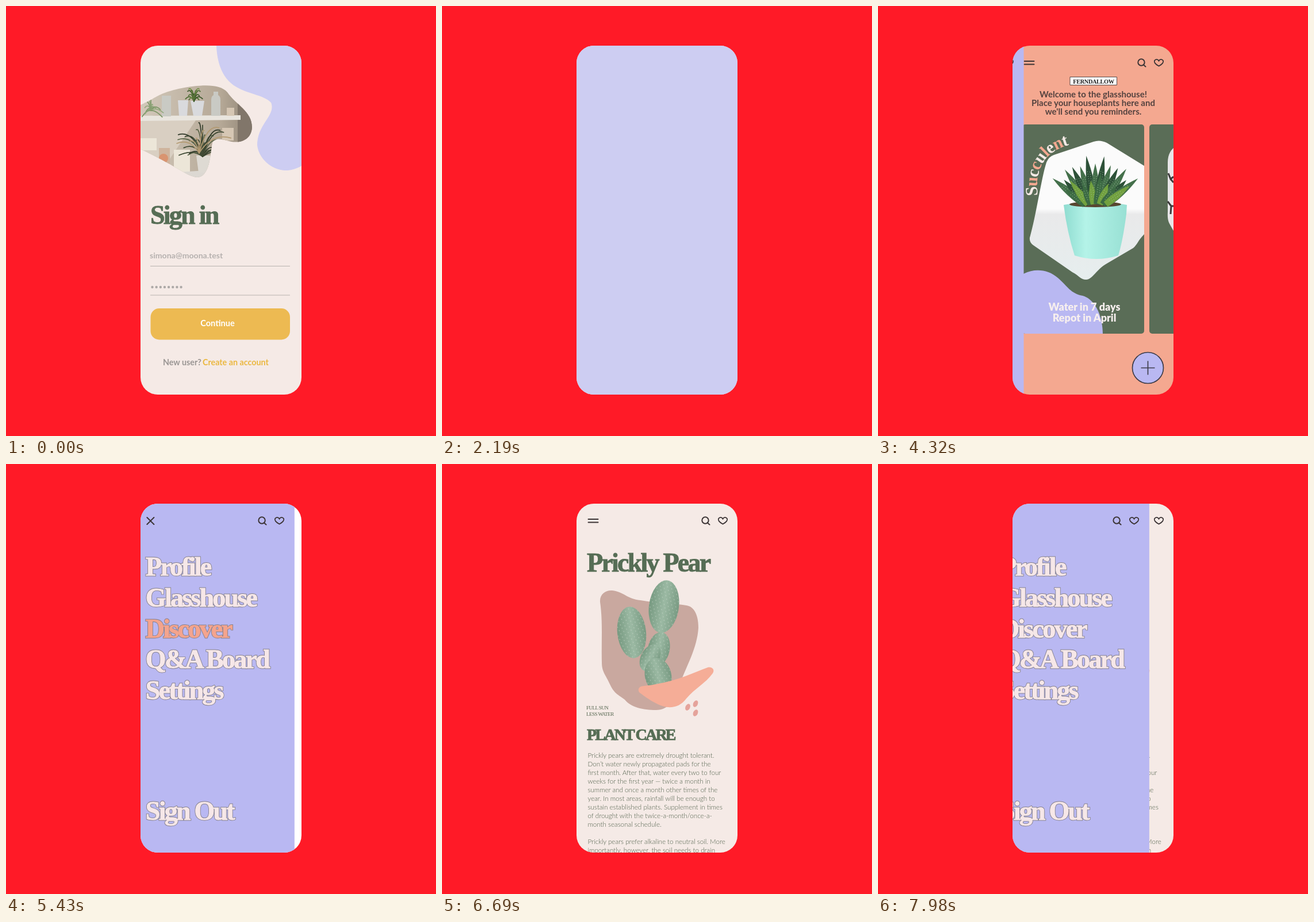
An HTML page that plays this animation: 748 px wide and 748 px high, repeating every 8000 ms.

```html
<!DOCTYPE html>
<html lang="en">
<head>
<meta charset="utf-8">
<title>Plant app</title>
<style>
html, body { margin: 0; height: 100%; overflow: hidden; background: #ff1a27; }
svg { display: block; width: 100vw; height: 100vh; }
text { font-family: Lato, sans-serif; font-weight: 700; }
.serif { font-family: "Liberation Serif", serif; letter-spacing: -.04em; }
.title { fill: #566d55; stroke: #566d55; stroke-width: .9; }
.big { font-size: 46px; letter-spacing: -.06em; }
.small { font-size: 9px; font-weight: 400; letter-spacing: -.06em; }
.mid { text-anchor: middle; }
.line { fill: none; stroke: #3b3435; stroke-width: 2; stroke-linecap: round; }
.heavy text { font-size: 18px; font-weight: 900; }
#body text { font-size: 11.6px; font-weight: 300; fill: #4c5d47; }
#items { color: #f6e7e8; }
#items text { fill: currentColor; stroke: currentColor; stroke-width: 1; }
#items .edge { stroke: #85818f; stroke-width: 2.8; }
</style>
</head>
<body>
<svg viewBox="0 0 748 748">
  <defs>
    <clipPath id="phone"><rect x="234" y="69" width="280" height="607" rx="30"/></clipPath>
    <clipPath id="shelfShape"><path d="M234 172C262 160 262 153 300 144C340 136 372 135 385 150C400 172 428 183 428 211C427 230 412 239 392 236C376 232 364 228 359 238C355 258 355 298 332 298C312 295 300 280 234 249Z"/></clipPath>
    <clipPath id="card"><rect x="251" y="206" width="212" height="364" rx="5"/></clipPath>
    <linearGradient id="wall"><stop stop-color="#d2c8ba"/><stop offset=".7" stop-color="#b5a896"/><stop offset="1" stop-color="#8b8072"/></linearGradient>
    <linearGradient id="backdrop" x2="0" y2="1"><stop offset=".49" stop-color="#fbfbfb"/><stop offset=".53" stop-color="#e9e9ea"/><stop offset="1" stop-color="#e6eeee"/></linearGradient>
    <linearGradient id="mint"><stop stop-color="#8fdcd0"/><stop offset=".35" stop-color="#b4f3e8"/><stop offset="1" stop-color="#98e0d4"/></linearGradient>
    <linearGradient id="pad"><stop stop-color="#769980"/><stop offset=".5" stop-color="#9bb9a3"/><stop offset="1" stop-color="#789a82"/></linearGradient>
    <pattern id="spines" width="8" height="10" patternUnits="userSpaceOnUse" patternTransform="rotate(18)">
      <path d="M2 2l1 2M6 7l1 2" stroke="#d3e0d2" stroke-opacity=".6"/>
    </pattern>
    <path id="arc" d="M278 330Q268 250 350 238"/>
    <g id="tools" class="line">
      <circle cx="458" cy="98" r="5.7"/><path d="M462 102.5L465.5 105.5"/>
      <path stroke-width="1.8" d="M488.5 104.5C482 101 480 97.5 481 95C483 92 486.5 92 488.5 95.5C490.5 92 494 92 496 95C497 97.5 495 101 488.5 104.5Z"/>
    </g>
    <g id="bar"><use href="#tools"/><path class="line" d="M254.5 96H271.5M254.5 101.5H271.5"/></g>
  </defs>

  <rect width="748" height="748" fill="#ff1a27"/>
  <g clip-path="url(#phone)">
    <g id="signIn">
      <path d="M234 69h280v607H234z" fill="#f5eae6"/>
      <g clip-path="url(#shelfShape)">
        <path d="M234 130h200v170H234z" fill="url(#wall)"/>
        <path d="M403 130h30v110h-30z" fill="#81766a"/>
        <path d="M234 199H330L262 300H234z" fill="#d9cfc2"/>
        <path d="M234 191L408 190V198L234 200z" fill="#e9e5de"/>
        <path d="M271 156h16v36h-16zM357 163q0-6 4-8v-6h8v6q4 2 4 8v28h-16z" fill="#c9cac4"/>
        <path d="M299 164h18l-2 27h-14zM321 165h24l-4 26h-15z" fill="#d9dadd"/>
        <path d="M384 177h13v14h-13zM376 212h20v22h-20z" fill="#d6c7b4"/>
        <path d="M234 230h28v21h-28zM292 250h28v42h-28z" fill="#ece6d8"/>
        <path d="M266 247h19v28h-19z" fill="#cfb49d"/><circle cx="274" cy="265" r="8" fill="#d99470"/>
        <path d="M288 290L360 285V300H288z" fill="#dcd8d2"/>
        <path d="M331 260h26l-4 30h-18z" fill="#dedad3"/>
        <g id="grass" fill="none" stroke-linecap="round"></g>
      </g>
      <text class="serif title big" x="251" y="379">Sign in</text>
      <text x="250" y="439" font-size="14.1" fill="#b5b0ae">simona@moona.test</text>
      <path d="M254.5 489H306" stroke="#aeaaa8" stroke-width="4.4" stroke-linecap="round" stroke-dasharray="0 7.15"/>
      <path d="M251 452.5H494M251 503H494" stroke="#b9b3af"/>
      <rect id="press" x="251.5" y="526" width="242.5" height="54.5" rx="15"/>
      <text class="mid" x="368" y="557" font-size="14.6" fill="#fff">Continue</text>
      <text x="273" y="625" font-size="14.3" fill="#999593">New user?</text>
      <text x="342" y="625" font-size="14.3" fill="#ebb840">Create an account</text>
      <path id="wave" fill="#cdcdf2" d="M366 69C367 95 374 122 396 138C420 154 448 154 461 168C470 190 437 205 437 242C440 268 465 287 490 286Q503 285 514 278C530 270 600 240 640 200V-60H366Z"/>
    </g>

    <g id="home">
      <path d="M234 69h280v607H234z" fill="#f4a890"/>
      <use href="#bar"/>
      <path d="M334 123.5h81.5v14H334z" fill="#fff" stroke="#5a4a48"/>
      <text class="serif mid" x="375" y="134.5" font-size="10.4" font-weight="400" fill="#222">FERNDALLOW</text>
      <g class="mid" font-size="15" fill="#54423f">
        <text x="374.5" y="159">Welcome to the glasshouse!</text>
        <text x="374.5" y="174">Place your houseplants here and</text>
        <text x="374.5" y="189">we'll send you reminders.</text>
      </g>
      <rect x="472" y="206" width="60" height="364" rx="5" fill="#5a6d57"/>
      <path d="M514 247Q504 256 504 272V358C503 376 507 378 514 391Z" fill="#e8e6e8"/>
      <path d="M505 291l4 10 5-4M509 301l5 6M504 340l6 8-1 14M510 348h4" fill="none" stroke="#3d3b3c" stroke-width="3"/>
      <g clip-path="url(#card)">
        <path d="M251 206h212v364H251z" fill="#5a6d57"/>
        <path d="M375 236Q386 232 398 238L463 278V397C452 408 452 414 444 421L398 448C380 458 373 476 362 476C352 476 350 469 338 463L270 416Q263 411 264 403C275 365 284 300 293 272Q297 262 306 259Z" fill="url(#backdrop)"/>
        <path d="M323 346Q378 336 433 346L432 362Q426 408 418 434Q380 446 342 434Q329 394 323 346Z" fill="url(#mint)"/>
        <ellipse cx="378" cy="345" rx="45" ry="5" fill="#584630"/>
        <g id="leaves"></g>
        <path d="M251 467C270 456 295 457 313 473C330 488 335 500 356 504C378 510 391 540 391 570H251Z" fill="#b9b8f2"/>
        <text class="serif" font-size="30"><textPath id="curved" href="#arc"/></text>
      </g>
      <g class="mid heavy" fill="#f7efee">
        <text x="359" y="530">Water in 7 days</text>
        <text x="359" y="549">Repot in April</text>
      </g>
      <ellipse id="drop" cy="629.5" stroke="#3c3b48" stroke-width="1.7"/>
      <path id="plus" d="M457.5 629.5H481.5M469.5 617.5V641.5" stroke="#3c3b48" stroke-width="1.7"/>
    </g>

    <g id="blank"><path d="M234 69h280v607H234z" fill="#fff"/><use href="#bar"/></g>

    <g id="detail">
      <path d="M234 69h280v607H234z" fill="#f5eae6"/>
      <use href="#bar"/>
      <text class="serif title big" x="252" y="187">Prickly Pear</text>
      <path fill="#c9a89f" d="M275 240C274 226 285 219 296 220C316 222 322 235 345 237C380 243 410 243 425 246C440 248 446 265 446 285C444 320 425 352 415 380C405 410 395 428 372 428C350 428 328 423 318 410C308 402 300 400 293 385C284 365 278 362 278 345C277 310 280 275 275 240Z"/>
      <g id="cactus"></g>
      <path fill="#f5ad97" d="M342 391C345 384 355 387 372 383C410 377 440 362 462 354C470 352 475 358 471 364C458 382 440 390 425 408C416 420 405 424 392 423C372 420 350 402 344 398Q341 395 342 391Z"/>
      <g fill="#e5a39b">
        <ellipse cx="427.5" cy="423" rx="4" ry="6" transform="rotate(25 427.5 423)"/>
        <ellipse cx="441" cy="417" rx="4" ry="6" transform="rotate(25 441 417)"/>
        <ellipse cx="441" cy="433" rx="4" ry="6" transform="rotate(25 441 433)"/>
      </g>
      <g fill="#55664f">
        <text class="serif small" x="251" y="427">FULL SUN</text>
        <text class="serif small" x="251" y="437.5">LESS WATER</text>
      </g>
      <text class="serif title" x="252" y="480" font-size="28" style="letter-spacing:-.1em">PLANT CARE</text>
      <g id="body"></g>
    </g>

    <g id="menu">
      <path d="M234 69h280v607H234z" fill="#b9b8f2"/>
      <use href="#tools" x="-.8"/>
      <path class="line" d="M257.5 93L269.5 105M269.5 93L257.5 105"/>
      <g id="items"></g>
    </g>
  </g>
</svg>
<script>
const $ = id => document.getElementById(id);
const LOOP = 8000;

// Still parts
const add = (id, markup) => $(id).insertAdjacentHTML('beforeend', markup);

function tuft(x, y, blades, length, spread, colors) {
  for (let i = 0; i < blades; i++) {
    const a = (i / (blades - 1) - .5) * spread;
    const r = length * (.7 + .3 * Math.sin(i * 5.3));
    const tx = x + Math.sin(a) * r, ty = y - Math.cos(a) * r;
    add('grass', `<path d="M${x} ${y}Q${x + (tx - x) * .4} ${ty - 4} ${tx} ${ty + Math.abs(a) * 5}" stroke="${colors[i % colors.length]}" stroke-width="1.7"/>`);
  }
}
tuft(327, 166, 17, 25, 2, ['#4d6b32', '#3b5529', '#77924b']);
tuft(252, 182, 13, 22, 3.4, ['#7d9668', '#93a97d']);
tuft(342, 262, 25, 60, 2.7, ['#3a4630', '#566145', '#2f3828']);
tuft(336, 256, 6, 64, 2.1, ['#b39a72']);

function leaf(angle, length, width, color) {
  const x = 378 + angle * 20, y = 345;
  add('leaves', `<g transform="translate(${x} ${y}) rotate(${angle * 57})">
    <path d="M${-width * .6} 0Q${-width} ${-length * .45} 0 ${-length}Q${width} ${-length * .45} ${width * .6} 0Z" fill="${color}"/>
    <path d="M-2 -9V${-length * .7}M2 -12V${-length * .7}" stroke="#a9c4a4" stroke-width="1" stroke-dasharray="1 3"/></g>`);
}
for (let i = 0; i < 13; i++) leaf((i - 6) * .15, 80 + 9 * Math.cos(i * 2.6) - Math.abs(i - 6) * 2.8, 10, i % 2 ? '#2d5138' : '#44704b');
for (let i = 0; i < 8; i++) leaf((i - 3.5) * .26, 44 + 9 * Math.sin(i * 2), 9, i % 2 ? '#72a13f' : '#3c6b43');

for (const [x, y, rx, ry, turn] of [[377, 322, 19, 30, 12], [362, 337, 16, 25, 28], [376, 368, 23, 31, -14], [330, 293, 25, 45, -6], [386, 248, 26, 46, 8]])
  for (const fill of ['pad', 'spines'])
    add('cactus', `<ellipse cx="${x}" cy="${y}" rx="${rx}" ry="${ry}" transform="rotate(${turn} ${x} ${y})" fill="url(#${fill})"/>`);

[...'Succulent'].forEach((c, i) => add('curved', `<tspan fill="${i % 2 ? '#f4a890' : '#f5eae6'}">${c}</tspan>`));

`Prickly pears are extremely drought tolerant.
Don’t water newly propagated pads for the
first month. After that, water every two to four
weeks for the first year — twice a month in
summer and once a month other times of the
year. In most areas, rainfall will be enough to
sustain established plants. Supplement in times
of drought with the twice-a-month/once-a-
month seasonal schedule.

Prickly pears prefer alkaline to neutral soil. More
importantly, however, the soil needs to drain`
  .split('\n').forEach((s, i) => add('body', `<text x="253.5" y="${511 + i * 15}">${s}</text>`));

// Each menu entry is a wide grey outline under a filled face
[['Profile', 194], ['Glasshouse', 247.5], ['Discover', 302], ['Q&amp;A Board', 355], ['Settings', 409], ['Sign Out', 619]]
  .forEach(([s, y]) => add('items', '<g>' + ['edge', 'face'].map(c =>
    `<text class="serif big ${c}" x="255" y="${y}">${s}</text>`).join('') + '</g>'));
const discover = $('items').children[2];

// Motion
const progress = (t, start, length) => Math.min(1, Math.max(0, (t - start) / length));
const slide = u => u + u * u - u * u * u;
const swell = u => u < .5 ? 2 * u * u : 1 - 2 * (1 - u) ** 2;
const show = (id, on) => $(id).style.display = on ? '' : 'none';

// Smooth curve through rows of [time, ...values]
function spline(t, rows, col) {
  let i = 0;
  while (i < rows.length - 2 && t > rows[i + 1][0]) i++;
  const slope = k => k > 0 && k < rows.length - 1
    ? (rows[k + 1][col] - rows[k - 1][col]) / (rows[k + 1][0] - rows[k - 1][0]) : 0;
  const span = rows[i + 1][0] - rows[i][0], u = progress(t, rows[i][0], span), v = 1 - u;
  return rows[i][col] * v * v * (1 + 2 * u) + rows[i + 1][col] * u * u * (3 - 2 * u)
    + span * u * v * (slope(i) * v - slope(i + 1) * u);
}
// time, centre x, radius x, radius y
const shrink = [[2400, 518, 650, 720], [2750, 518, 380, 420], [3090, 518, 100, 110], [3180, 505, 77, 87], [3450, 469.5, 27, 27]];

function menuShown(t) {
  if (t < 5400) return slide(progress(t, 4300, 320));
  if (t < 7000) return 1 - slide(progress(t, 5401, 720));
  return slide(progress(t, 7475, 720));
}

function draw(t) {
  show('signIn', t < 2400);
  show('home', t >= 2400 && t < 5400);
  show('blank', t >= 5400 && t < 6690);
  show('detail', t >= 6690);

  $('press').setAttribute('fill', t >= 960 && t < 1080 ? '#d9a53f' : '#edba52');
  const scale = 1 + 5.5 * swell(progress(t, 1380, 810));
  $('wave').setAttribute('transform', `translate(512 120) scale(${scale}) translate(-512 -120)`);

  const drop = $('drop');
  ['cx', 'rx', 'ry'].forEach((name, i) => drop.setAttribute(name, spline(t, shrink, i + 1)));
  const tint = 20 * (1 - progress(t, 2400, 600));
  drop.setAttribute('fill', `rgb(${185 + tint}, ${184 + tint}, 242)`);
  drop.setAttribute('stroke-opacity', progress(t, 3360, 90));
  show('plus', t >= 3630);

  const shown = menuShown(t);
  show('menu', shown > 0);
  $('menu').setAttribute('transform', `translate(${280 * (shown - 1)})`);
  discover.style.color = t >= 4920 && t < 7000 ? '#f4a48e' : '';
}

function tick() {
  draw(performance.now() % LOOP);
  requestAnimationFrame(tick);
}
tick();
</script>
</body>
</html>
```
